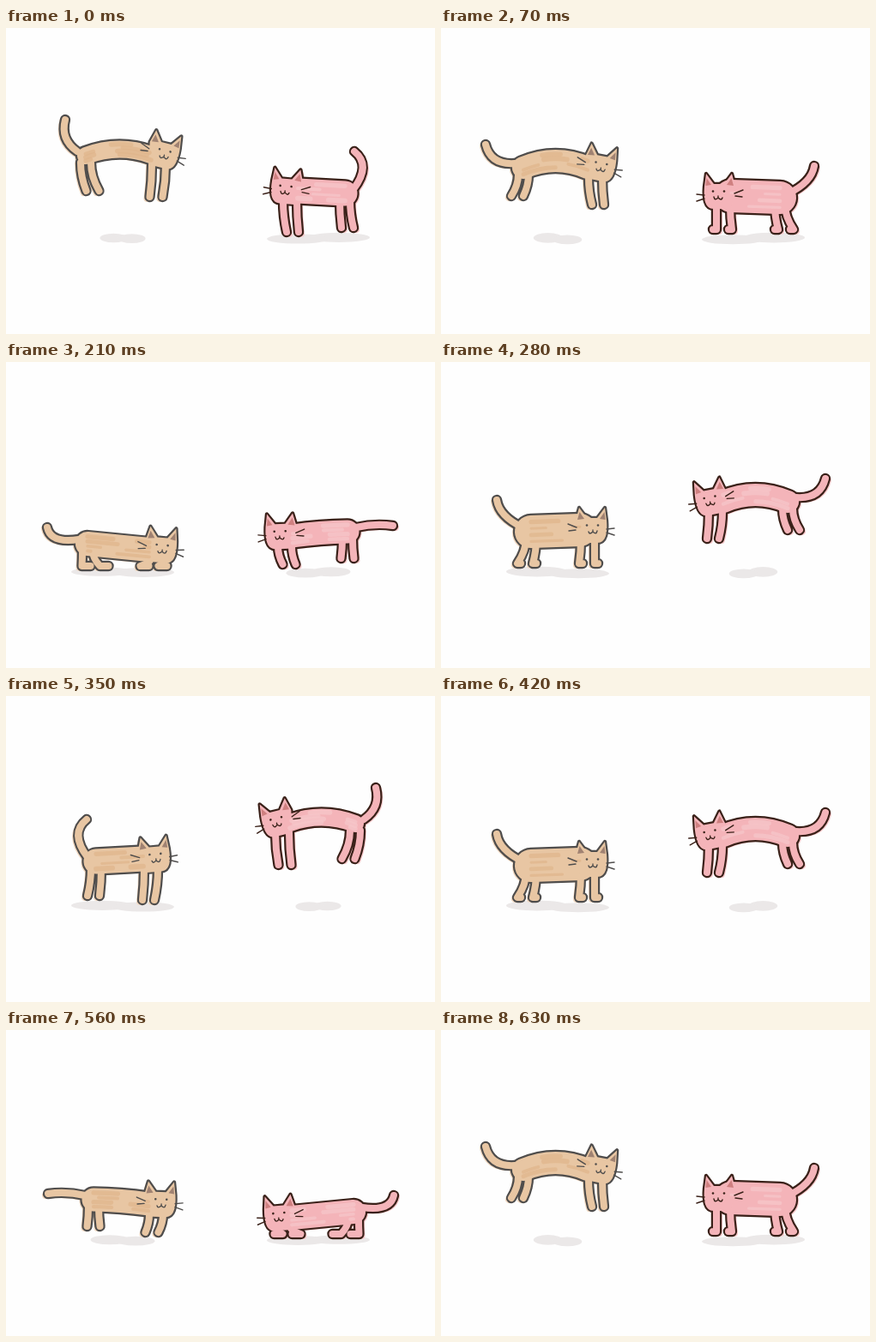
These frames come from a looping animation (500 by 357 pixels, 700 ms). An HTML page:

```html
<!DOCTYPE html>
<html lang="en">
<head>
<meta charset="utf-8">
<title>Two leaping cats</title>
<style>
  html, body { margin: 0; width: 100%; height: 100%; overflow: hidden; background: #fefefe; }
  /* Six poses side by side, stepped through forwards and back */
  #strip { display: block; width: 3000px; height: 357px; animation: flip 700ms step-end infinite; }
  @keyframes flip {
    0%, 100% { transform: translateX(0); }
    10%, 90% { transform: translateX(-500px); }
    20%, 80% { transform: translateX(-1000px); }
    30%, 70% { transform: translateX(-1500px); }
    40%, 60% { transform: translateX(-2000px); }
    50% { transform: translateX(-2500px); }
  }
  path { fill: none; stroke-linecap: round; stroke-linejoin: round; }
</style>
</head>
<body>
<svg id="strip" viewBox="0 0 3000 357" xmlns="http://www.w3.org/2000/svg"></svg>
<script>
const WIDTH = 500, GROUND = 238, LIMB = 8, OUTLINE = 2.2;
const TAN = { ink: '#4f4d4c', main: '#e8c6a3', wash: '#e0b68c', spill: '#f1d9c2', ear: '#a08272' };
const PINK = { ink: '#3a2119', main: '#f4b4b9', wash: '#f7c8cb', spill: '#f8cacc', ear: '#cf8080' };

// From the top of the leap down to standing. Tip and bend shape the tail,
// hind and front lie midway between each pair of paws.
const poses = [
  { tip: [69, 107], bend: [63, 130], hip: [93, 149], head: [183, 150], tilt: 14,
    hind: [101, 190], front: [175, 197], gap: 15, girth: 20, arch: 7 },
  { tip: [52, 136], bend: [58, 160], hip: [96, 163], head: [185, 165], tilt: 11,
    hind: [89, 196], front: [183, 206], gap: 14, girth: 26, arch: 8 },
  { tip: [49, 191], bend: [70, 188], hip: [102, 198], head: [180, 205], tilt: 2,
    hind: [102, 229], front: [170, 236], gap: 15, girth: 27, arch: 1 },
  { tip: [48, 193], bend: [52, 212], hip: [95, 212], head: [181, 221], tilt: 5,
    hind: [104, 238], front: [172, 238], gap: 21, girth: 28, toe: 5 },
  { tip: [65, 161], bend: [68, 180], hip: [105, 198], head: [176, 198], tilt: 0,
    hind: [100, 235], front: [172, 235], gap: 18, girth: 38, toe: 2 },
  { tip: [94, 144], bend: [74, 160], hip: [105, 193], head: [174, 192], tilt: -5,
    hind: [102, 233], front: [166, 238], gap: 14, girth: 29 }
];

// Drawn around the middle of the face
const HEAD = 'M-19-13L-15-28L-6-16H6L15-28L17-13C18 0 17 13 6 13H-14Z';
const EARS = 'M-17-14L-14.5-23L-9-15ZM9-15L14.5-23L15.5-14Z';
const FACE = 'M-4 0q1 4 5 0q4 4 5-1M1 0v-2';
const WHISKERS = 'M-28-9l10 4M-27-1l8-1M17-3l9-1M17 1l9 3';

function random(seed) {
  return () => {
    seed = (seed * 16807) % 2147483647;
    return seed / 2147483647;
  };
}

const shift = ([x, y], dx, dy) => [x + dx, y + dy];
const quad = (a, b, c) => `M${a}Q${b} ${c}`;
const line = (d, color, width, extra = '') =>
  `<path d="${d}" stroke="${color}" stroke-width="${width}" ${extra}/>`;

function torso({ hip, head, arch = 0 }) {
  const neck = shift(head, -14, -2);
  const middle = [(hip[0] + neck[0]) / 2, (hip[1] + neck[1]) / 2 - 2 * arch];
  return quad(hip, middle, neck);
}

function legs(joint, paws, { gap, toe = 0 }, spread) {
  return [-1, 1].map(side => {
    const top = shift(joint, side * spread, 0);
    const paw = shift(paws, side * gap / 2 - toe, 0);
    return quad(top, [top[0], (top[1] + paw[1]) / 2], paw) + `h${2 * toe}`;
  }).join('');
}

const onHead = (pose, art) =>
  `<g transform="translate(${pose.head}) rotate(${pose.tilt})">${art}</g>`;

// The whole silhouette in one colour, widened by grow
function silhouette(pose, color, grow = 0) {
  const tail = quad(pose.tip, pose.bend, shift(pose.hip, -10, -5));
  const limbs = tail + legs(shift(pose.hip, 0, 8), pose.hind, pose, 6) +
    legs(shift(pose.head, -5, 10), pose.front, pose, 8);
  return line(limbs, color, LIMB + grow) +
    line(torso(pose), color, pose.girth + grow) +
    onHead(pose, line(HEAD, color, grow, `style="fill:${color}"`));
}

// Brush streaks that follow the back
function washes(pose, color, rnd) {
  return [-0.3, -0.1, 0.1, 0.3].map(level => line(torso(pose), color, 3 + rnd() * 3,
    `stroke-dasharray="${20 + rnd() * 30} ${20 + rnd() * 20}" stroke-dashoffset="${rnd() * 50}"
     transform="translate(0 ${level * pose.girth})" opacity=".7"`)).join('');
}

// Small in the air, spread out under a cat on its feet
function shadow(pose, rnd) {
  const lift = GROUND - pose.hind[1];
  const reach = lift > 8 ? 40 - lift * 0.28 : 60;
  return [-1, 1].map(side => `<ellipse cx="${136 + side * reach * 0.4}" cy="${245 + side * rnd() * 2}"
    rx="${reach * 0.6}" ry="${5 + rnd()}" fill="#ebe8e8"/>`).join('');
}

function face(pose, look) {
  const eyes = [-6, 7].map(x => `<circle cx="${x}" cy="-7.5" r="1.3" fill="${look.ink}"/>`).join('');
  return onHead(pose, `<path d="${EARS}" style="fill:${look.ear}"/>` + eyes +
    line(FACE + WHISKERS, look.ink, 1.4));
}

function cat(step, look, mirrored) {
  const pose = poses[step], rnd = random(step * 7919 + 101);
  const flip = mirrored ? `transform="translate(${WIDTH}) scale(-1 1)"` : '';
  return `<g ${flip}>` + shadow(pose, rnd) +
    `<g transform="translate(-3 2)">${silhouette(pose, look.spill)}</g>` +
    silhouette(pose, look.ink, 2 * OUTLINE) +
    silhouette(pose, look.main) +
    washes(pose, look.wash, rnd) +
    face(pose, look) + '</g>';
}

// The second cat mirrors the first, half a cycle apart
document.getElementById('strip').innerHTML = poses.map((_, i) =>
  `<g transform="translate(${i * WIDTH})">` +
  cat(i, TAN, false) + cat(poses.length - 1 - i, PINK, true) + '</g>').join('');
</script>
</body>
</html>
```
